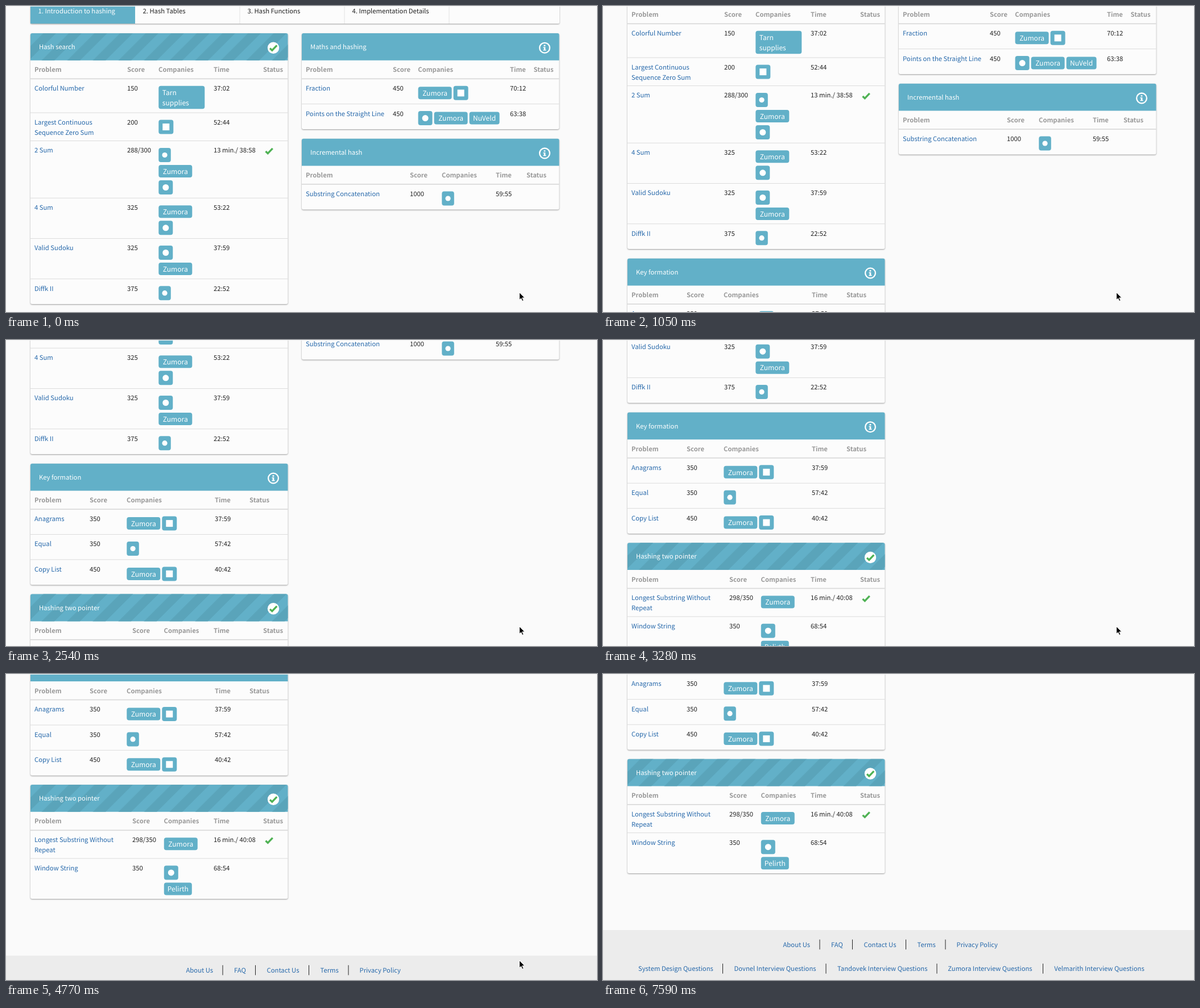
Write an HTML page that moves like this. It is 1039 px wide and 539 px high and loops after 8000 ms.

```html
<!DOCTYPE html>
<html lang="en">
<head>
<meta charset="utf-8">
<title>Hashing problems</title>
<style>
html, body { margin: 0; width: 100%; height: 100%; overflow: hidden; background: #fafafa; }
svg { display: block; width: 100%; height: 100%; }
text {
  font: 11.27px "Noto Sans CJK SC", "Noto Sans CJK JP", "Noto Sans CJK KR", "Noto Sans CJK TC", "Noto Sans CJK", "Open Sans", sans-serif;
  fill: #222; text-rendering: geometricPrecision;
}
.link { fill: #2769ab; }
.head { fill: #999; font-weight: 700; }
.white { fill: #fff; }
.tag { fill: #fff; font-size: 12.05px; }
.mid { text-anchor: middle; }
.card { filter: drop-shadow(0 1px 1.2px rgba(0, 0, 0, .38)); }
</style>
</head>
<body>
<svg viewBox="0 0 1039 539">
  <defs>
    <pattern id="stripes" width="45" height="48" patternUnits="userSpaceOnUse" patternTransform="skewX(-45)">
      <rect x="22.5" width="22.5" height="48" fill="#5aa4ba"/>
    </pattern>
  </defs>
  <rect width="1039" height="539" fill="#fafafa"/>
  <g id="page"></g>
  <rect width="1039" height="1" fill="#f8f8f8"/>
  <path id="cursor" d="M0 0V13.2L3 10.4L5.2 15.2L7.4 14.2L5.2 9.5H9.4Z" fill="#000" stroke="#fff" stroke-width="1"/>
</svg>
<script>
const LOOP = 8000, BLUE = '#62b0c8', CARD_W = 452.5;

const rect = (x, y, w, h, fill, r = 0) =>
  `<rect x="${x}" y="${y}" width="${w}" height="${h}" rx="${r}" fill="${fill}"/>`;
const text = (x, y, str, cls = '') => `<text x="${x}" y="${y}" class="${cls}">${str}</text>`;
const at = (x, y, body) => `<g transform="translate(${x} ${y})">${body}</g>`;

const tick = (x, y) => at(x, y,
  '<path d="M-6 .8L-2.2 4.4L6.2-4.4" fill="none" stroke="#4fb254" stroke-width="3.3"/>');
const doneIcon = (x, y) => at(x, y, '<circle r="10.2" fill="#fff"/>') + tick(x, y);
const infoIcon = (x, y) => at(x, y,
  '<circle r="8.9" fill="none" stroke="#fff" stroke-width="2.3"/>' +
  '<path d="M-1.5-5.2h2.8v2.4h-2.8zM-2.5-1.5h3.8v4.8h1.2v1.6h-5v-1.6h1.2v-3.2h-1.2z" fill="#fff"/>');

// Tags: words carry text lines, the others a plain mark
const TAGS = {
  Z: { w: 59, words: ['Zumora'] },
  N: { w: 53, words: ['NuVeld'] },
  P: { w: 49, words: ['Pelirth'] },
  T: { w: 81, words: ['Tarn', 'supplies'] },
  g: { w: 25, mark: '<circle r="5.5" fill="#fff"/>' },
  w: { w: 26, mark: rect(-6, -6, 12, 12, '#fff') },
  f: { w: 21.5, mark: '<circle r="4.6" fill="#fff"/>' }
};

function tag({ w, words, mark }, x, y) {
  if (mark) return rect(x, y - 12.5, w, 25, BLUE, 4) + at(x + w / 2, y, mark);
  if (words.length > 1) {
    return rect(x, y - 12.5, w, 40.5, BLUE, 4) +
      words.map((s, i) => text(x + 6.5, y + 4 + i * 18, s, 'tag')).join('');
  }
  return rect(x, y - 11, w, 22, BLUE, 4) + text(x + w / 2, y + 4.8, words[0], 'tag mid');
}

function tagLines(lines, x, y) {
  const wordOnly = lines[0] === 'Z';
  return lines.map((line, i) => {
    let left = x;
    return [...line].map(key => {
      const out = tag(TAGS[key], left, y + (wordOnly ? 24 : 25) + i * 28.5);
      left += TAGS[key].w + 3;
      return out;
    }).join('');
  }).join('');
}

// Row: [height, title, score, tags, time, solved]
function card({ x, y, title, done, cols, rows }) {
  const height = 80.3 + rows.reduce((sum, row) => sum + row[0], 0);
  const cap = `M0 47.8V3a3 3 0 0 1 3-3H${CARD_W - 3}a3 3 0 0 1 3 3V47.8Z`;
  let out = `<g class="card">${rect(0, 0, CARD_W, height, '#fcfcfc', 3)}</g>` +
    `<path d="${cap}" fill="${BLUE}"/>` +
    (done ? `<path d="${cap}" fill="url(#stripes)"/>` : '') +
    text(15, 28.2, title, 'white') +
    (done ? doneIcon : infoIcon)(427, 25.7);
  ['Problem', 'Score', 'Companies', 'Time', 'Status'].forEach((s, i) => {
    out += text(cols[i] - x, 68.4, s, 'head');
  });
  out += rect(0, 79.4, CARD_W, 1.7, '#dadada');
  let top = 80.3;
  rows.forEach(([h, name, score, tags, time, solved], n) => {
    const base = top + 20.9;
    name.split('|').forEach((s, i) => { out += text(cols[0] - x, base + i * 17.8, s, 'link'); });
    out += text(cols[1] - x, base, score) + text(cols[3] - x, base, time) +
      tagLines(tags.split(' '), cols[2] - x + .3, top);
    if (solved) out += tick(cols[4] - x + 10.5, top + 17.7);
    top += h;
    if (n < rows.length - 1) out += rect(0, top - .5, CARD_W, 1, '#dcdcdc');
  });
  return at(x, y, out);
}

const cards = [
  { x: 43, y: 48, title: 'Hash search', done: true, cols: [50, 213, 268, 365, 452], rows: [
    [59.7, 'Colorful Number', '150', 'T', '37:02'],
    [49.5, 'Largest Continuous|Sequence Zero Sum', '200', 'w', '52:44'],
    [100.8, '2 Sum', '288/300', 'f Z g', '13 min./ 38:58', true],
    [71.2, '4 Sum', '325', 'Z g', '53:22'],
    [71.2, 'Valid Sudoku', '325', 'g Z', '37:59'],
    [44.4, 'Diffk II', '375', 'f', '22:52']] },
  { x: 43, y: 541.8, title: 'Key formation', cols: [50, 147, 212, 367, 428], rows: [
    [44.4, 'Anagrams', '350', 'Zw', '37:59'],
    [44.4, 'Equal', '350', 'f', '57:42'],
    [44.4, 'Copy List', '450', 'Zw', '40:42']] },
  { x: 43, y: 771.6, title: 'Hashing two pointer', done: true, cols: [50, 222, 277.5, 365, 452], rows: [
    [49.6, 'Longest Substring Without|Repeat', '298/350', 'Z', '16 min./ 40:08', true],
    [71.2, 'Window String', '350', 'g P', '68:54']] },
  { x: 520, y: 48, title: 'Maths and hashing', cols: [527, 680, 724.3, 886, 927.5], rows: [
    [44.3, 'Fraction', '450', 'Zw', '70:12'],
    [44.4, 'Points on the Straight Line', '450', 'gZN', '63:38']] },
  { x: 520, y: 233.7, title: 'Incremental hash', cols: [527, 710, 766, 861, 915], rows: [
    [44.4, 'Substring Concatenation', '1000', 'f', '59:55']] }
];

function tabs() {
  let out = `<g class="card">${rect(43, -20, 930, 51, '#fcfcfc', 2)}</g>` + rect(43, -20, 184, 51, BLUE);
  ['Introduction to hashing', 'Hash Tables', 'Hash Functions', 'Implementation Details'].forEach((s, i) => {
    out += text(56.5 + i * 184, 13.4, `${i + 1}. ${s}`, i ? '' : 'white');
    if (i) out += rect(42.5 + (i + 1) * 184, -20, 1, 51, '#e2e2e2');
  });
  return out;
}

function links(y, items, bars) {
  return items.map(([x, s]) => text(x, y + 4.3, s, 'link')).join('') +
    bars.map(x => rect(x - .5, y - 9, 1, 17.5, '#222')).join('');
}

const footer = () => rect(0, 1072.8, 1039, 120, '#ececec') +
  links(1098.5, [[316.5, 'About Us'], [401, 'FAQ'], [458.5, 'Contact Us'], [552.5, 'Terms'], [621.5, 'Privacy Policy']],
    [381, 438.5, 532.5, 602]) +
  links(1141, [[62, 'System Design Questions'], [230.5, 'Dovnel Interview Questions'],
    [412, 'Tandovek Interview Questions'], [606.3, 'Zumora Interview Questions'],
    [793.3, 'Velmarith Interview Questions']], [210.5, 392, 587, 773.5]);

const page = document.getElementById('page');
const cursor = document.getElementById('cursor');
page.innerHTML = tabs() + cards.map(card).join('') + footer();

// Bursts of wheel scrolling: [start, positions]
const TICK = 145;
const SCROLL = [
  [150, [4, 10]],
  [600, [28, 59.5, 84, 97]],
  [1500, [126, 169.3, 205, 223]],
  [2395, [275, 324, 341, 350]],
  [3130, [379, 414.3, 436, 447]],
  [3870, [468, 498, 520, 531]],
  [4770, [576.6, 600, 613, 619, 621.8]]
];
const POINTER = [
  [6255, [[906, 490], [925, 440], [953, 370], [976, 285], [994, 190], [1001, 95], [997, 11], [975, 24]]],
  [7440, [[954, 85], null]]
];

function stepAt(bursts, t, first) {
  let value = first;
  for (const [start, steps] of bursts) {
    if (t < start) break;
    value = steps[Math.min(steps.length - 1, Math.floor((t - start) / TICK))];
  }
  return value;
}

function draw(t) {
  page.setAttribute('transform', `translate(0 ${-stepAt(SCROLL, t, 0)})`);
  const tip = stepAt(POINTER, t, [902.5, 504.5]);
  cursor.style.display = tip ? '' : 'none';
  if (tip) cursor.setAttribute('transform', `translate(${tip})`);
}

function frame() {
  draw(performance.now() % LOOP);
  requestAnimationFrame(frame);
}
frame();
</script>
</body>
</html>
```
